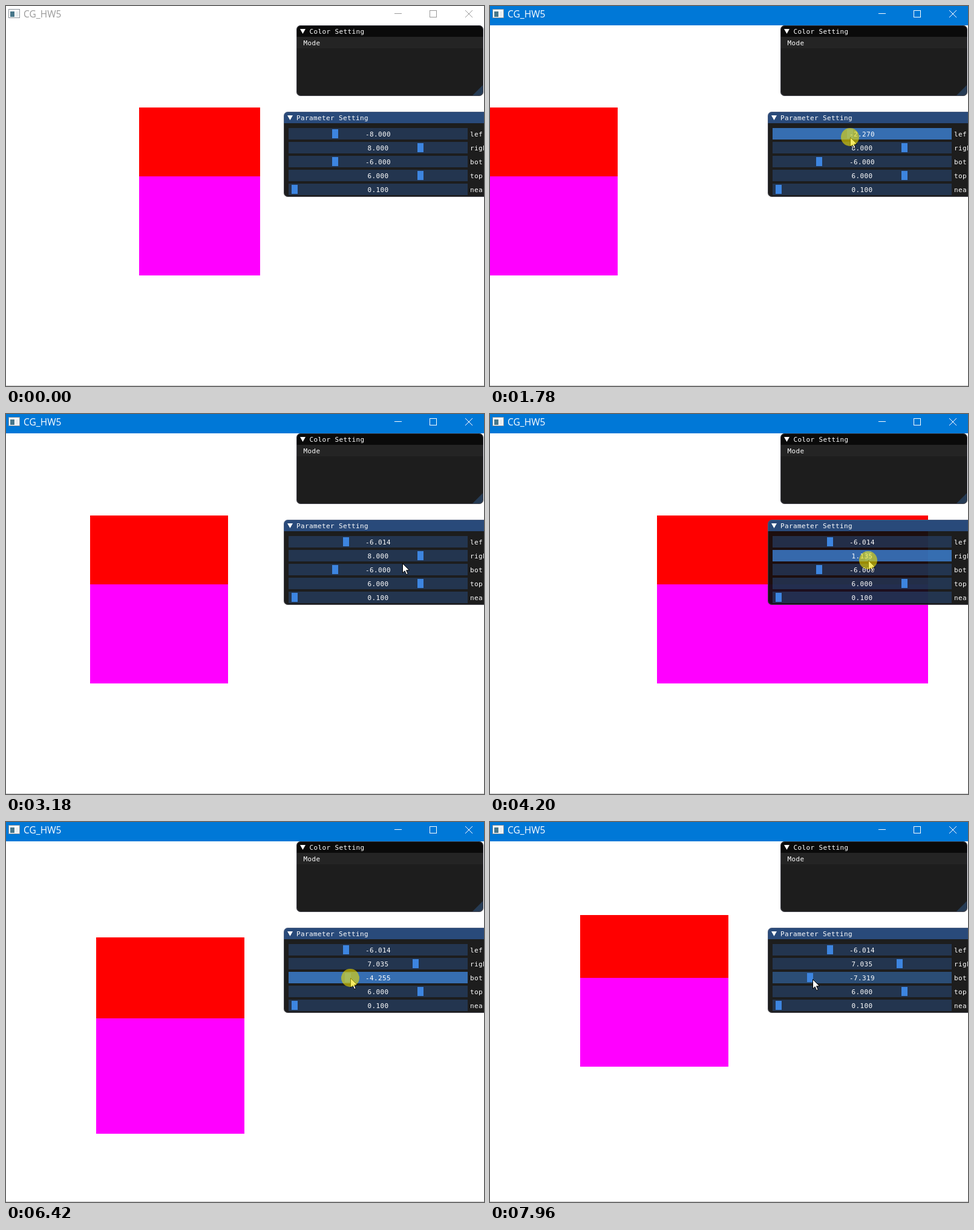
An HTML page for the animation above (8 s loop, 790x629 px).

```html
<!DOCTYPE html>
<html lang="en">
<head>
<meta charset="utf-8">
<title>CG_HW5</title>
<style>
  html, body { margin: 0; width: 100%; height: 100%; overflow: hidden; background: #fff; }
  svg { display: block; width: 790px; height: 629px; }
  rect, .crisp { shape-rendering: crispEdges; }
  .mono { font: 11px "DejaVu Sans Mono", monospace; letter-spacing: .378px; fill: #fff; white-space: pre; }
  .name { font: 15.5px "Open Sans", sans-serif; fill: #999; }
  .caption { fill: #fff; }
  .button { fill: none; stroke: #999; }
  .focused .caption { fill: #0078d7; }
  .focused .name { fill: #fff; }
  .focused .button { stroke: #fff; }
  .edge { fill: none; stroke: rgb(110 110 128 / .5); shape-rendering: auto; }
  .bar { fill: rgb(41 74 122 / .54); }
  .bar.hover { fill: rgb(66 150 250 / .4); }
  .bar.active { fill: rgb(66 150 250 / .67); }
  .grab { fill: #3d85e0; }
</style>
</head>
<body>
<svg viewBox="0 0 790 629">
  <rect id="upper" fill="#f00"/>
  <rect id="lower" fill="#f0f"/>

  <g id="chrome">
    <rect class="caption" width="790" height="32"/>
    <rect x="4.5" y="5.5" width="18" height="14" fill="#fff" stroke="#8a9299"/>
    <rect x="7" y="9" width="7" height="9" fill="#47778a"/>
    <rect x="15" y="9" width="6" height="9" fill="#e9eef0"/>
    <text class="name" x="29" y="19">CG_HW5</text>
    <path class="button crisp" d="M642 12.5h12M700.5 7.5h11v11h-11z"/>
    <path class="button" d="M759 7l12 12M771 7l-12 12"/>
  </g>

  <g>
    <path fill="#0f0f0f" fill-opacity=".94" d="M480 51h309v91a7 7 0 0 1-7 7h-295a7 7 0 0 1-7-7z"/>
    <path fill="#0a0a0a" d="M480 51v-12a7 7 0 0 1 7-7h295a7 7 0 0 1 7 7v12z"/>
    <rect x="480" y="51" width="309" height="19" fill="#242424"/>
    <path fill="#4296fa" fill-opacity=".25" d="M788 131v11a6 6 0 0 1-6 6h-11z"/>
    <rect class="edge" x="480.5" y="32.5" width="308" height="116" rx="7"/>
    <path fill="#fff" d="M486 38h9l-4.5 8z"/>
    <text class="mono" x="501.5" y="46">Color Setting</text>
    <text class="mono" x="491.5" y="65">Mode</text>
  </g>

  <g id="panel">
    <path fill="#0f0f0f" fill-opacity=".94" d="M459 194h340v122h-333a7 7 0 0 1-7-7z"/>
    <path fill="#294a7a" d="M459 194v-12a7 7 0 0 1 7-7h333v19z"/>
    <rect class="edge" x="459.5" y="175.5" width="345" height="140" rx="7"/>
    <path fill="#fff" d="M465 181h9l-4.5 8z"/>
    <text class="mono" x="480" y="189">Parameter Setting</text>
  </g>

  <rect y="628" width="790" height="1" fill="#000" fill-opacity=".22"/>
  <g id="pointer">
    <path fill="#fff" stroke="#000" d="M.5 .5v15.5l3.6-3.3 2.6 6 2.5-1.1-2.6-5.9h5z"/>
    <circle id="halo" r="15" fill="#f0e000" fill-opacity=".6"/>
  </g>
</svg>
<script>
const LOOP = 8000, FOCUS = 960, MID = 615, TRAVEL = 282;
const LAG = 40; // the sliders answer the pointer a little late
const $ = id => document.getElementById(id);

// Each move eases the pointer to a new place.
const home = { x: 685, y: 595 };
const moves = [
  { from: 60, to: 680, x: 543, y: 212 },
  { from: 1290, to: 1740, x: 595, y: 217 },
  { from: 2030, to: 2440, x: 576, y: 217 },
  { from: 2620, to: 2840, x: 562, y: 216 },
  { from: 2900, to: 3180, x: 655, y: 247 },
  { from: 3180, to: 3410, x: 685, y: 241 },
  { from: 3540, to: 4160, x: 625, y: 242 },
  { from: 4530, to: 5350, x: 677, y: 243 },
  { from: 5580, to: 6000, x: 544, y: 258 },
  { from: 6080, to: 6700, x: 588, y: 258 },
  { from: 6930, to: 7900, x: 529, y: 260 },
  { from: 7920, to: 7960, x: 533, y: 260 }
];

const rows = [
  { label: "lef", start: -8, range: 16, press: FOCUS, release: 2880 },
  { label: "righ", start: 8, range: 16, press: 3500, release: 5580 },
  { label: "bot", start: -6, range: 12, press: 6050, release: 7920 },
  { label: "top", start: 6, range: 12 },
  { label: "near", start: 0.1, grabX: 477 }
];

function set(el, attrs) {
  for (const key in attrs) el.setAttribute(key, attrs[key]);
}

function add(tag, attrs, text = "") {
  const el = document.createElementNS("http://www.w3.org/2000/svg", tag);
  set(el, attrs);
  el.textContent = text;
  return $("panel").appendChild(el);
}

rows.forEach((row, i) => {
  row.y = 202 + 23 * i;
  row.bar = add("rect", { class: "bar", x: 467, y: row.y, width: 296, height: 19 });
  row.grab = add("rect", { class: "grab", y: row.y + 2, width: 10, height: 15 });
  row.text = add("text", { class: "mono", y: row.y + 14 });
  add("text", { class: "mono", x: 767, y: row.y + 14 }, row.label);
});

const held = (row, t) => t >= row.press && t < row.release;

function pointerAt(t) {
  let { x, y } = home;
  for (const m of moves) {
    const k = Math.min(1, Math.max(0, (t - m.from) / (m.to - m.from)));
    const ease = k * k * (3 - 2 * k);
    x += (m.x - x) * ease;
    y += (m.y - y) * ease;
  }
  return { x: Math.round(x), y: Math.round(y) };
}

function valueAt(row, t) {
  if (!(t >= row.press)) return row.start;
  const { x } = pointerAt(Math.min(t, row.release));
  return (x - MID) * 2 * row.range / TRAVEL;
}

// Orthographic projection of the two stacked boxes.
function drawBoxes(left, right, bottom, top) {
  const px = x => Math.round(-5 + 800 * (x - left) / (right - left));
  const py = y => Math.round(32 + 600 * (top - y) / (top - bottom));
  const x = px(-3.5), width = px(0.5) - x;
  const [y0, y1, y2] = [3.289, 0.9905, -2.28].map(py);
  set($("upper"), { x, width, y: y0, height: y1 - y0 });
  set($("lower"), { x, width, y: y1, height: y2 - y1 });
}

function drawRow(row, value, t, busy) {
  const { x, y } = pointerAt(t);
  const label = value.toFixed(3);
  const center = row.grabX || MID - 0.5 + value * TRAVEL / 2 / row.range;
  const over = x >= 467 && x < 763 && y >= row.y && y < row.y + 19;
  const hover = over && !busy && t >= FOCUS;
  set(row.bar, { class: held(row, t) ? "bar active" : hover ? "bar hover" : "bar" });
  set(row.grab, { x: Math.round(center - 5) });
  set(row.text, { x: MID - 3.5 * label.length });
  row.text.textContent = label;
}

function render(t) {
  const { x, y } = pointerAt(t);
  const seen = t - LAG;
  const values = rows.map(row => valueAt(row, seen));
  const busy = rows.some(row => held(row, seen));
  rows.forEach((row, i) => drawRow(row, values[i], seen, busy));
  drawBoxes(...values);
  set($("chrome"), { class: t >= FOCUS ? "focused" : "" });
  set($("pointer"), {
    transform: `translate(${x} ${y})`,
    visibility: t < moves[0].from ? "hidden" : "visible"
  });
  set($("halo"), { display: rows.some(row => held(row, t)) ? "inline" : "none" });
}

const begin = performance.now();
function tick() {
  render((performance.now() - begin) % LOOP);
  requestAnimationFrame(tick);
}
tick();
</script>
</body>
</html>
```
